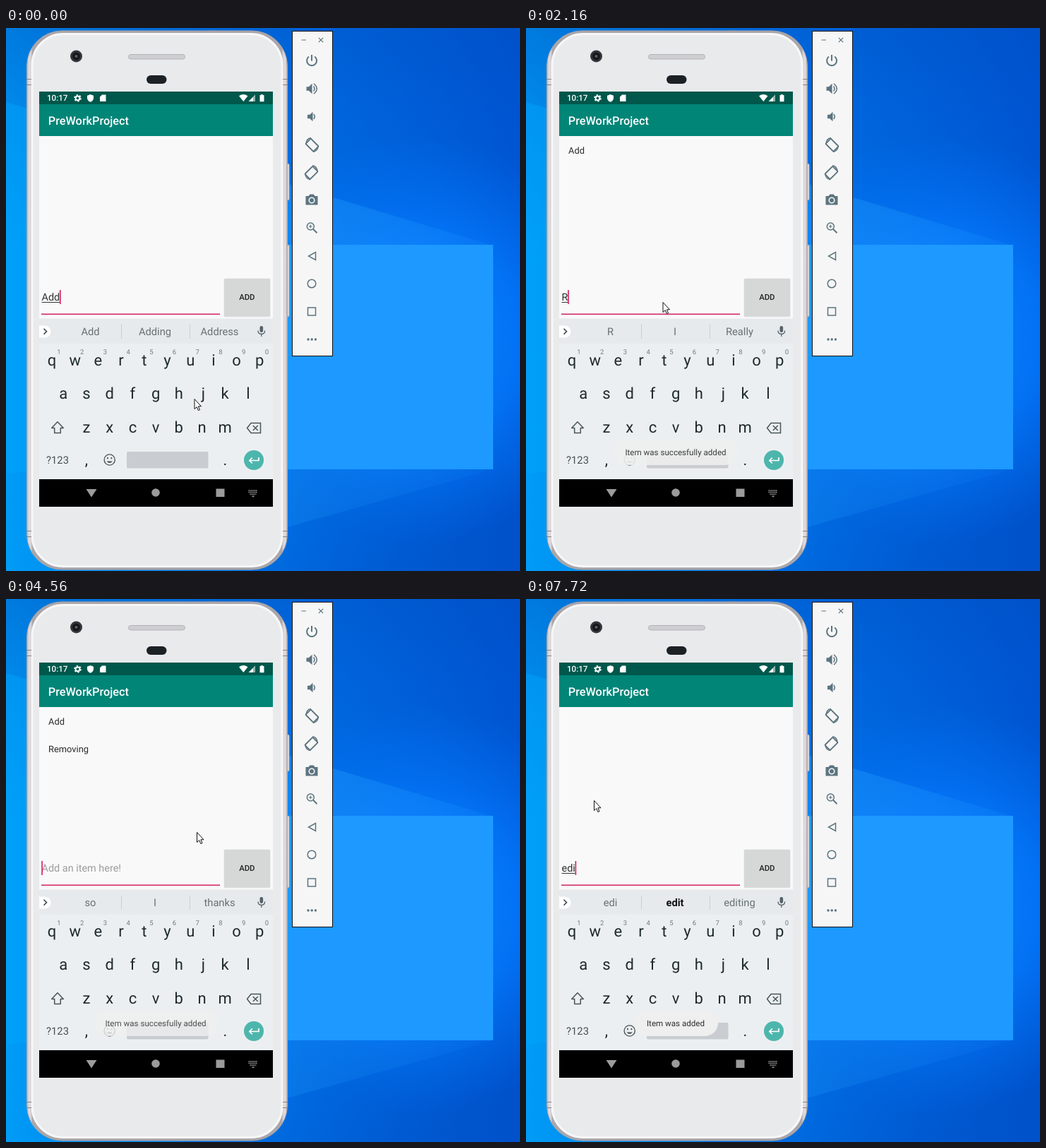
Recreate the animation shown at these times as an HTML page. Size 728 by 769 pixels, loop 8 s.

```html
<!DOCTYPE html>
<html lang="en">
<head>
<meta charset="utf-8">
<title>List app demo</title>
<style>
html, body { margin: 0; width: 100%; height: 100%; overflow: hidden; background: #0068e0; }
svg { display: block; width: 100vw; height: 100vh; }
text { font-family: Roboto, sans-serif; text-rendering: geometricPrecision; white-space: pre; }
.line { fill: none; stroke: #5c747f; stroke-width: 1.5; }
.solid { fill: #5c747f; }
.key { font-size: 22px; fill: #1f2a2f; text-anchor: middle; }
.num { font-size: 9.5px; fill: #6f7b80; text-anchor: middle; }
.sug { font-size: 14.7px; fill: #667074; text-anchor: middle; }
.item { font-size: 12.9px; fill: #2b2b2b; }
</style>
</head>
<body>
<svg viewBox="0 0 728 769" preserveAspectRatio="none">
  <defs>
    <linearGradient id="sky">
      <stop offset="0" stop-color="#009cf6"/><stop offset=".05" stop-color="#0096f4"/>
      <stop offset=".58" stop-color="#0070e8"/><stop offset="1" stop-color="#0057d6"/>
    </linearGradient>
    <linearGradient id="shade" x2="0" y2="1">
      <stop offset="0" stop-color="#0048b8" stop-opacity=".4"/><stop offset=".16" stop-color="#0048b8" stop-opacity=".2"/>
      <stop offset=".4" stop-color="#0048b8" stop-opacity="0"/>
    </linearGradient>
    <linearGradient id="dusk" gradientUnits="userSpaceOnUse" x1="380" y1="560" x2="560" y2="800">
      <stop offset="0" stop-color="#0048b8" stop-opacity="0"/><stop offset="1" stop-color="#0048b8" stop-opacity=".4"/>
    </linearGradient>
    <radialGradient id="glow" gradientUnits="userSpaceOnUse" cx="585" cy="440" r="290">
      <stop offset="0" stop-color="#0a86ff"/><stop offset=".5" stop-color="#0478fc" stop-opacity=".8"/>
      <stop offset="1" stop-color="#0070f0" stop-opacity="0"/>
    </radialGradient>
    <linearGradient id="beam">
      <stop offset="0" stop-color="#2aa5ff" stop-opacity=".4"/><stop offset="1" stop-color="#2aa5ff" stop-opacity=".1"/>
    </linearGradient>
    <linearGradient id="rim">
      <stop offset="0" stop-color="#b3aeb1"/><stop offset=".008" stop-color="#e2dddf"/>
      <stop offset=".016" stop-color="#d6d1d4"/><stop offset=".022" stop-color="#aaa6aa"/>
      <stop offset=".978" stop-color="#aaa6aa"/><stop offset=".984" stop-color="#d6d1d4"/>
      <stop offset=".992" stop-color="#e2dddf"/><stop offset="1" stop-color="#b3aeb1"/>
    </linearGradient>
  </defs>

  <!-- desktop -->
  <rect width="728" height="769" fill="url(#sky)"/>
  <rect width="728" height="769" fill="url(#shade)"/>
  <rect width="728" height="769" fill="url(#dusk)"/>
  <rect x="290" y="145" width="438" height="600" fill="url(#glow)"/>
  <path d="M0 105L40 117V626L0 632Z" fill="#00a4fb" opacity=".45"/>
  <path d="M380 215L690 308 380 350Z" fill="url(#beam)"/>
  <path d="M380 600L690 625 380 712Z" fill="url(#beam)" opacity=".5"/>
  <rect x="372" y="307" width="318" height="318" fill="#1d99ff"/>

  <!-- phone -->
  <path d="M289 7V4h9v3" fill="#777" stroke="#777"/>
  <rect x="396" y="192" width="5" height="52" rx="2" fill="#e6e5e8" stroke="#a9a9b0"/>
  <rect x="396" y="307" width="5" height="102" rx="2" fill="#e6e5e8" stroke="#a9a9b0"/>
  <rect x="29.500" y="4" width="369" height="763" rx="50" fill="url(#rim)" stroke="#a8a4a8"/>
  <rect x="37" y="8.500" width="354" height="754" rx="44" fill="#e9eaec" stroke="#f7f7f8" stroke-width="3"/>
  <path d="M29 72.500h7M29 80.500h7M392 72.500h7M392 80.500h7M29 712.500h7M29 720.500h7M392 712.500h7M392 720.500h7" stroke="#85818a"/>
  <circle cx="99.500" cy="40" r="8.500" fill="#33363a"/>
  <circle cx="99.500" cy="40" r="5.500" fill="#15171a"/>
  <circle cx="99.500" cy="40" r="2" fill="#59616a"/>
  <rect x="173.500" y="37.500" width="80" height="6.500" rx="3.200" fill="#cfcfd2" stroke="#b4b4b8"/>
  <rect x="199" y="67" width="28.500" height="12" rx="6" fill="#1c2126"/>

  <!-- app -->
  <rect x="47" y="90" width="331" height="588" fill="#f9f9f9"/>
  <rect x="47" y="90" width="331" height="18.500" fill="#00574b"/>
  <rect x="47" y="108" width="331" height="45" fill="#008577"/>
  <text x="58" y="103.300" font-size="11.600" font-weight="500" fill="#fff">10:17</text>
  <circle cx="101.500" cy="99.300" r="2.900" fill="none" stroke="#fff" stroke-width="2"/>
  <circle cx="101.500" cy="99.300" r="4.500" fill="none" stroke="#fff" stroke-width="1.600" stroke-dasharray="2.350"/>
  <path d="M119.500 94L124 95.800V99.500Q123.500 103.300 119.500 104.800 115.500 103.300 115 99.500V95.800Z
    M136 94.500h5.500v9.500h-8.500v-6.500zM330 96.200Q336 91.800 342.500 96.200L336.300 104ZM353 94.500v9.500h-9.500z" fill="#fff"/>
  <path d="M350 97.500l3-3v9.500h-3z" fill="#8eb5af"/>
  <path d="M361.200 94h2.600v1h1.700v9.200h-6V95h1.700z" fill="#fff"/>
  <text x="59.800" y="137.300" font-size="16.300" font-weight="500" fill="#fff">PreWorkProject</text>
  <text class="item" x="60" y="178" id="item0"></text>
  <text class="item" x="60" y="216.500" id="item1"></text>
  <text x="50.500" y="386.300" font-size="14.440" id="field"></text>
  <rect x="50.500" y="388" height="1" fill="#333" id="under"/>
  <rect y="371" width="1.600" height="20" fill="#d81b60" id="caret"/>
  <rect x="50" y="404.500" width="253" height="1.600" fill="#d12a63"/>
  <rect x="308.500" y="354.500" width="66" height="55" rx="2" fill="#e4e5e5"/>
  <rect x="309" y="355" width="65" height="53.500" rx="1.500" id="button"/>
  <text x="341.300" y="385.300" font-size="11.300" font-weight="500" text-anchor="middle" fill="#222">ADD</text>

  <!-- keyboard -->
  <rect x="47" y="411.500" width="331" height="36" fill="#e7eaed"/>
  <rect x="47" y="447" width="331" height="192" fill="#eceff1"/>
  <path d="M47 421.500h8a8.500 8.500 0 0 1 0 17h-8z" fill="#fff"/>
  <path d="M53.500 425.800l4 4-4 4" fill="none" stroke="#37474f" stroke-width="1.600"/>
  <path d="M163.500 420v20M260.500 420v20" stroke="#c9ced1" id="bars"/>
  <text class="sug" x="119.500" y="435" id="sug0"></text>
  <text class="sug" x="211" y="435" id="sug1"></text>
  <text class="sug" x="302.500" y="435" id="sug2"></text>
  <rect x="359.500" y="422" width="4.600" height="9" rx="2.300" fill="#566269"/>
  <path d="M357 428.500q0 5 4.800 5t4.800-5M361.800 433.500v3.500" fill="none" stroke="#566269" stroke-width="1.300"/>
  <g id="keys"></g>
  <path d="M73 557.800l8.300 8.700h-4v7h-8.600v-7h-4z" fill="none" stroke="#48555b" stroke-width="1.500" stroke-linejoin="round"/>
  <path d="M347 559.500h13.500v14H347l-5.500-7zM349.800 563l7 7M356.800 563l-7 7" fill="none" stroke="#48555b" stroke-width="1.500"/>
  <text x="57" y="617" font-size="14.800" fill="#455157">?123</text>
  <g fill="none" stroke="#48555b" stroke-width="1.400">
    <circle cx="146.700" cy="611.500" r="7.600"/>
    <path d="M142.500 613.500q4.200 5 8.400 0z" fill="#48555b" stroke="none"/>
    <path d="M144 608v2.200M149.400 608v2.200" stroke-width="1.800"/>
  </g>
  <rect x="171" y="600" width="115.500" height="23.500" rx="2" fill="#c9cdd2"/>
  <circle cx="351" cy="612" r="14" fill="#4db6ac"/>
  <path d="M358 608v4.500h-13M348.800 608.500l-4 4 4 4" fill="none" stroke="#fff" stroke-width="1.700"/>
  <g id="toast">
    <rect y="582" height="37" rx="18.500" fill="#efefef" id="pill"/>
    <text x="212" y="604.800" font-size="11.600" text-anchor="middle" fill="#2e2e2e" id="note"></text>
  </g>

  <!-- navigation bar -->
  <rect x="47" y="639" width="331" height="39" fill="#000"/>
  <g fill="#9b9b9b">
    <path d="M113.500 653h15l-7.500 11.500z"/><circle cx="212" cy="658" r="5.800"/><rect x="297.500" y="652.500" width="12" height="11.500"/>
    <path d="M347.500 662.500h5l-2.500 2z"/>
  </g>
  <path d="M343.500 655h12.500M343.500 657.500h12.500M345.500 660.300h9" stroke="#9b9b9b" stroke-width="1.400" stroke-dasharray="1.500 .6"/>

  <!-- emulator toolbar -->
  <rect x="405.500" y="4.500" width="57" height="460" fill="#f6f6f6" stroke="#111"/>
  <path class="line" d="M418.500 17h6.500M442.800 13.800l6.400 6.400M449.200 13.800l-6.400 6.400" style="stroke-width:1.200"/>
  <g class="line">
    <path d="M433 38v8.500M429 40.500a7 7 0 1 0 8.200 0" stroke-width="2"/>
    <path d="M435.500 82.500q3 3.500 0 7M436 78.800q8.500 7.200 0 14.400M435.800 122q3 3.500 0 7"/>
    <g id="turn"><rect x="428.300" y="158" width="10.400" height="15.500" rx=".8" transform="rotate(-45 433.500 165.700)" stroke-width="1.900"/>
      <path d="M425 164q.5-7.500 7-8.500M442 168q-.5 6-7 7.500"/></g>
    <use href="#turn" transform="matrix(-1 0 0 1 866 39.300)"/>
    <circle cx="431.300" cy="281" r="5"/><path d="M435 284.700l5.500 5.500" stroke-width="2"/><path d="M428.800 281h5M431.300 278.500v5" stroke-width="1.200"/>
    <path d="M438.500 317.500v11l-10-5.500z"/><circle cx="433" cy="362" r="5.800"/><rect x="427.500" y="396" width="11" height="11"/>
  </g>
  <path class="solid" d="M425.500 83.200h3.300l4.700-4.500v14.600l-4.700-4.500h-3.300zM427 122.700h3.300l4.200-4v13.600l-4.200-4H427z
    M424.500 238h4l1.800-2.500h5.400l1.800 2.500h4v12.500h-17z"/>
  <circle cx="433" cy="244" r="3.800" fill="none" stroke="#f6f6f6" stroke-width="1.600"/>
  <g class="solid"><circle cx="428" cy="441" r="1.700"/><circle cx="433.200" cy="441" r="1.700"/><circle cx="438.400" cy="441" r="1.700"/></g>

  <path id="mouse" d="M.5.500V14.600L3.700 11.600 5.900 16.600 8 15.700 5.900 10.800H10Z" fill="#fff" stroke="#111" stroke-width="1"/>
</svg>
<script>
const $ = id => document.getElementById(id);
const LOOP = 8000, HINT = 'Add an item here!';
const idle = ['so', 'I', 'thanks'];
const added = 'Item was succesfully added', again = 'Item was added';

// Each step keeps what the earlier ones set.
const steps = [
  [0, { text: 'Add', caret: 1, mouse: [266.500, 525], items: [], sug: ['Add', 'Adding', 'Address'], bold: 0, press: 0, note: added, toast: 0 }],
  [150, { mouse: [310, 452] }],
  [270, { mouse: [335.500, 404] }],
  [420, { mouse: [337, 379], caret: 0 }],
  [700, { text: '', caret: 1, press: 1 }],
  [820, { items: ['Add'], sug: idle, press: .5, toast: .4, mouse: [325, 382] }],
  [940, { press: 0, toast: .8, mouse: [270, 386] }],
  [1090, { toast: .9, mouse: [215, 388] }],
  [1210, { caret: 0, mouse: [193.500, 388] }],
  [1730, { caret: 1 }],
  [2160, { text: 'R', sug: ['R', 'I', 'Really'] }],
  [2720, { caret: 0 }],
  [2840, { text: 'Re', caret: 1, sug: ['Re', 'Really', 'Red'], toast: .6 }],
  [2960, { text: 'Rem', sug: ['Rem', 'Remember', 'Remind'], toast: .25 }],
  [3080, { text: 'Remo', sug: ['Remo', 'Remove', 'Remote'], toast: 0 }],
  [3200, { text: 'Remov', sug: ['Remov', 'Removing', ''], bold: 1 }],
  [3350, { text: 'Removin', sug: ['Removin', 'Removing', ''] }],
  [3500, { text: 'Removing', sug: ['', 'Removing', ''], bold: 0 }],
  [3750, { mouse: [199, 383] }],
  [3900, { mouse: [234, 384] }],
  [4050, { mouse: [270.500, 383], caret: 0 }],
  [4170, { mouse: [325, 381] }],
  [4290, { mouse: [335, 380], text: '', caret: 1, press: 1 }],
  [4410, { items: ['Add', 'Removing'], sug: idle, press: .6, toast: .4 }],
  [4560, { press: 0, toast: .8, mouse: [270, 330] }],
  [4680, { toast: .9, mouse: [150, 235] }],
  [4800, { caret: 0, mouse: [85, 187] }],
  [4920, { mouse: [67.500, 177] }],
  [5350, { caret: 1 }],
  [5650, { mouse: [67.500, 172] }],
  [5770, { mouse: [67.500, 170] }],
  [5890, { items: ['Removing'], note: again, toast: .6, caret: 0 }],
  [6010, { toast: 1 }],
  [6410, { caret: 1 }],
  [6690, { items: [] }],
  [6810, { mouse: [78, 215] }],
  [6930, { caret: 0, mouse: [91, 265] }],
  [7050, { mouse: [96, 285] }],
  [7290, { caret: 1 }],
  [7570, { text: 'ed', sug: ['ed', 'edit', 'editing'], bold: 1 }],
  [7720, { text: 'edi', sug: ['edi', 'edit', 'editing'] }]
];
let last = {};
const states = steps.map(([at, set]) => ({ at, ...(last = { ...last, ...set }) }));

function key(x, y, label, cls) {
  const t = document.createElementNS('http://www.w3.org/2000/svg', 'text');
  t.setAttribute('x', x);
  t.setAttribute('y', y);
  t.setAttribute('class', cls);
  t.textContent = label;
  $('keys').append(t);
}
function row(letters, x, y) {
  [...letters].forEach((c, i) => key(x + i * 32.700, y, c, 'key'));
}
row('qwertyuiop', 65, 477.500);
row('asdfgh', 81.300, 525);
row('j', 279.500, 525);
row('kl', 310.200, 525);
row('zxcvbnm', 114, 572.500);
row(',', 114, 619);
row('.', 310.500, 619);
[...'1234567890'].forEach((c, i) => key(75 + i * 32.700, 462, c, 'num'));

const put = (id, attrs) => { for (const k in attrs) $(id).setAttribute(k, attrs[k]); };

function draw(s) {
  $('field').textContent = s.text || HINT;
  put('field', { fill: s.text ? '#2f2f2f' : '#9c9c9c' });
  const w = s.text ? $('field').getComputedTextLength() : 0;
  put('under', { width: w });
  put('caret', { x: 50.300 + w, opacity: s.caret });
  [0, 1].forEach(i => { $('item' + i).textContent = s.items[i] || ''; });
  s.sug.forEach((word, i) => { $('sug' + i).textContent = word; });
  $('sug1').style.fontWeight = s.bold ? 700 : 400;
  $('sug1').style.fill = s.bold ? '#111' : '';
  put('bars', { opacity: s.sug[0] ? 1 : 0 });
  const grey = v => Math.round(v - 27 * s.press);
  put('button', { fill: `rgb(${grey(214)},${grey(215)},${grey(215)})` });
  const half = s.note === added ? 88 : 59.500;
  $('note').textContent = s.note;
  put('pill', { x: 212.500 - half, width: half * 2 });
  put('toast', { opacity: s.toast });
  put('mouse', { transform: `translate(${s.mouse})` });
}

let shown;
const start = performance.now();
function tick() {
  const t = (performance.now() - start) % LOOP;
  const s = states.findLast(st => st.at <= t) || states[0];
  if (s !== shown) draw(shown = s);
  requestAnimationFrame(tick);
}
tick();
</script>
</body>
</html>
```
